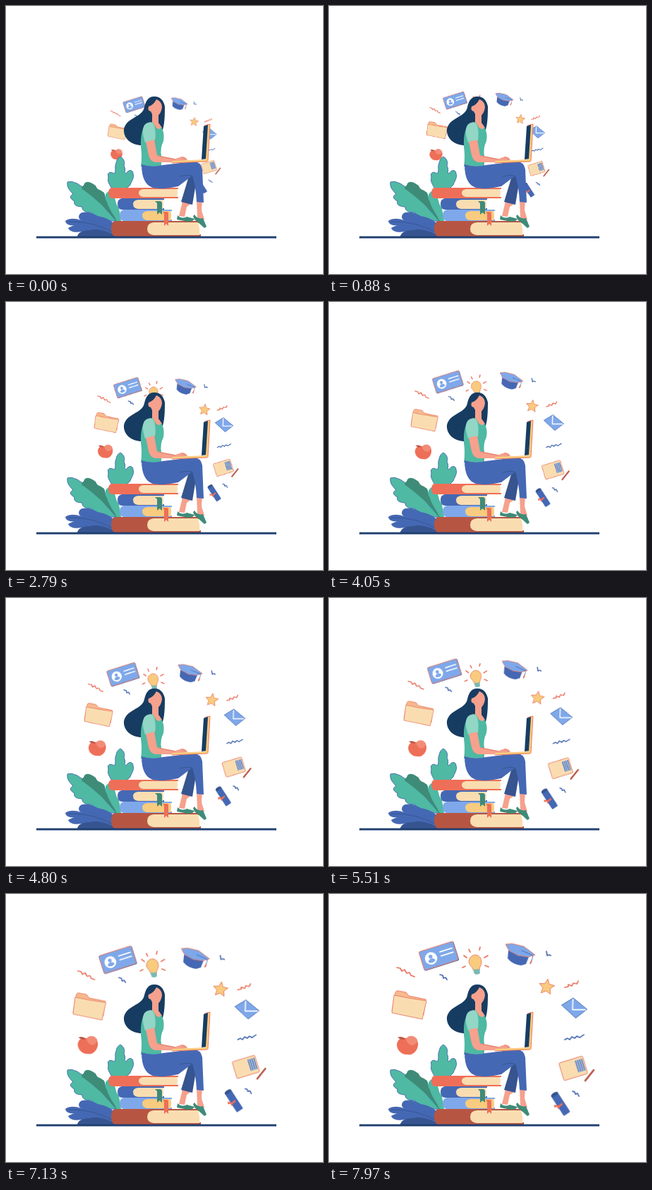
Write an HTML page that moves like this. It is 449x379 px and loops after 8000 ms.

```html
<!DOCTYPE html>
<html lang="en">
<head>
<meta charset="utf-8">
<title>Online learning</title>
<style>
  html, body { margin: 0; width: 100%; height: 100%; overflow: hidden; background: #fff; }
  svg { display: block; width: 100vw; height: 100vh; }
  #icons { transform-origin: 213.7px 204.4px; }
  .navy { fill: #173c62; } .blue { fill: #4568b4; } .deep { fill: #36548f; }
  .sky { fill: #7ea8ea; } .teal { fill: #4fb9a3; } .mint { fill: #92d6c5; }
  .green { fill: #3e8b78; } .skin { fill: #f5a18d; } .red { fill: #ee6f58; }
  .brick { fill: #b75543; } .cream { fill: #f9ddb1; } .gold { fill: #f8cb7e; }
  .line { fill: none; stroke-width: 1.7; stroke-linejoin: round; stroke-linecap: round; }
  .thin { stroke-width: .9; } .thick { stroke-width: 2.6; }
  .lr { stroke: #e9705a; } .lb { stroke: #4467b2; } .lw { stroke: #fff; }
  .ld { stroke: #36548f; } .ls { stroke: #d9806e; } .lk { stroke: #b75543; }
  .rimR { stroke: #ea7861; stroke-width: .9; } .rimB { stroke: #4467b2; stroke-width: .9; }
</style>
</head>
<body>
<svg viewBox="0 0 449 379" xmlns="http://www.w3.org/2000/svg">
  <g id="icons">
    <!-- id card -->
    <g transform="translate(155.5 87.5) rotate(-17.5)">
      <rect class="blue" x="-25.5" y="-13.5" width="51.5" height="28" rx="2"/>
      <rect class="sky rimR" x="-25.5" y="-14" width="50.5" height="27.5" rx="2"/>
      <circle cx="-11.5" cy="0" r="8.8" fill="#fff"/>
      <circle class="sky" cx="-11.5" cy="-2.6" r="2.7"/>
      <path class="sky" d="M-16.5 4.5c0-5.500 10-5.500 10 0q-5 3.500-10 0z"/>
      <path class="line lw" d="M3-5H21M3 1H21"/>
    </g>
    <!-- light bulb -->
    <path class="line lr" d="M200 82L198 78M213 79L214 75M220 90L225 87M221 101L226 103M193 102L189 104M195 90L191 87"/>
    <path class="gold rimR" d="M204 107C203 102 198 101 198 95C199 89 203 86 208 86C213 87 216 91 216 96C216 101 213 102 213 108Z"/>
    <path fill="#79b9b2" d="M204 107L213 106L214 112Q210 115 206 113Z"/>
    <!-- graduation cap -->
    <path class="blue" d="M254 80L253 91Q259 99 272 101L279 99L283 89Z"/>
    <path class="sky rimR" d="M250 71L259 70L276 74L292 86L282 89L268 87L255 80Z"/>
    <path class="line lb thin" d="M273 80L289 87L286 98"/>
    <path class="line lr" d="M287 94L285 98"/>
    <path class="line lb" d="M308 81L309 87L312 86L314 87"/>
    <!-- star -->
    <path class="gold rimR" transform="translate(308.300 131.500) rotate(8)"
      d="M0-11.500L3.200-4.400L10.900-3.500L5.200 1.700L6.700 9.300L0 5.500L-6.700 9.300L-5.200 1.700L-10.900-3.500L-3.200-4.400Z"/>
    <path class="line lr" d="M334 132L339 131L339 128L344 130L346 126L351 127L353 123"/>
    <!-- envelope -->
    <path class="sky rimB" d="M329.500 157L346 147L365.500 163L349.500 175.500Z"/>
    <path class="line lw" d="M345.500 149L345 163.500L363 163.500"/>
    <path class="line lb" d="M334 206L338 204L341 206L344 202L348 204L351 201L355 203L361 199"/>
    <!-- notepad and pencil -->
    <g transform="translate(346 246.5) rotate(-17)">
      <rect class="cream rimR" x="-17.5" y="-13" width="35" height="26" rx="1.5"/>
      <path fill="#a9bcd6" d="M5-9.500H16V8H5z"/>
      <path class="line thin lb" d="M6-9V7M9-9V7M12-9V7M15-9V7"/>
    </g>
    <path class="line thick lk" d="M363 264L375 249"/>
    <path class="line lb" d="M345 279L348 280L349 283L352 282L354 286"/>
    <!-- diploma -->
    <g transform="translate(328 296.8) rotate(57)">
      <rect class="blue" x="-17" y="-5.5" width="34" height="11" rx="1.5"/>
      <ellipse class="deep" cx="-16" cy="0" rx="2.5" ry="5.5"/>
    </g>
    <path class="red" d="M319 298L325 299L330 295L331 298L327 301L325 305L323 301L319 302Z"/>
    <!-- apple -->
    <path class="red" d="M111 204C119 198 127 205 126 214C125 223 117 229 111 227C103 228 96 221 96 213C97 204 104 202 111 204Z"/>
    <path fill="#f28c76" d="M109 205C112 199 121 199 125 206C125 215 112 218 109 205Z"/>
    <path class="brick" d="M97 203Q103 200 108 205Q102 207 97 203Z"/>
    <!-- folder -->
    <path fill="#f6b98d" class="rimR" d="M92 146L94 139Q95 136 99 137L109 139L113 144L137 149L134 171L89 166Z"/>
    <path class="cream rimR" d="M92 143L112 147L138 151L132 177L89 168Z"/>
    <path class="line lr" d="M96 104L101 105L103 109L107 107L110 112L114 111L116 115L121 117"/>
    <path class="line lb" d="M157 114L161 115L162 119L165 118L167 121"/>
  </g>

  <!-- plants -->
  <path class="teal rimB" d="M150 259C147 252 143 249 145 242C143 236 147 233 153 237C157 233 153 228 156 222C157 216 160 214 162 213C167 216 169 221 167 226C171 232 166 235 170 237C173 231 180 231 180 237C182 243 178 247 176 253L169 260Z"/>
  <path class="teal" d="M157 305C139 297 137 279 141 267C143 261 150 260 151 266C156 271 154 279 160 286L163 304Z"/>
  <path class="teal rimB" d="M157 305L113 255C107 258 104 251 98 250C94 248 90 248 87 249C86 257 90 260 95 266C89 269 91 273 97 276C95 282 102 284 108 284C107 290 114 292 121 292C128 300 143 303 157 305Z"/>
  <path class="green" d="M157 305Q138 280 107 258C108 254 110 255 111 251C115 246 122 250 127 254C129 260 132 259 136 262C143 265 138 271 143 277C145 287 153 294 157 305Z"/>
  <path class="blue" d="M157 326H101C102 323 103 321 107 319C98 321 90 319 88 314C91 312 94 311 97 310C90 311 85 309 84 304C89 300 98 300 106 303C101 300 103 293 108 292C116 290 125 294 130 297C142 299 151 304 157 312Z"/>
  <path class="deep" d="M156 326H101C102 321 109 317 118 317C130 314 144 318 156 326Z"/>
  <path class="line thin ld" d="M88 305Q125 304 153 321"/>

  <!-- books -->
  <path class="brick" d="M155 304H274V307H272V323H276V326H155Q149 325 149 315Q149 305 155 304Z"/>
  <path class="cream" d="M209 306H272Q275 315 274 324H209Q200 323 200 315Q200 307 209 306Z"/>
  <path class="sky" d="M167 288H235V290H233V302H235V304H167Q161 303 161 296Q161 289 167 288Z"/>
  <path class="gold" d="M200 290H233Q235 296 233 303H200Q193 302 193 296Q193 291 200 290Z"/>
  <path class="blue" d="M164 272H224V274H222V286H224V288H164Q158 287 158 280Q158 273 164 272Z"/>
  <path class="cream" d="M187 274H222Q224 280 222 287H187Q180 286 180 280Q180 275 187 274Z"/>
  <path class="red" d="M150 257H244V259H242V270H244V272H150Q145 271 145 264Q145 258 150 257Z"/>
  <path class="cream" d="M194 259H242Q244 264 242 270H194Q188 269 188 264Q188 260 194 259Z"/>
  <path class="green" d="M211 276H219L221 278V295L217.500 292L214 295V279Z"/>
  <path class="red" d="M222 291H229L230 293V311L227 308L224 311V294Z"/>

  <!-- woman -->
  <path class="navy" d="M211 128C202 127 198 134 196 143C193 158 171 157 167 174C166 187 177 197 193 197L211 185L222 175C225 166 225 150 225 142C223 133 218 128 211 128Z"/>
  <path class="skin" d="M250 276L263 279L256 284L253 298L245 297Z"/>
  <path class="skin" d="M270 274H278L277 289L281 302L271 300Z"/>
  <path class="deep" d="M261 234L271 239L264 281L248 277Z"/>
  <path class="skin" d="M207 150H216V165L221 172L211 187L200 171L207 164Z"/>
  <path class="skin" d="M213 132Q221 135 221 143Q220 152 214 156Q207 155 205 149Q200 148 202 142Q209 140 213 132Z"/>
  <path class="teal" d="M199 166Q206 163 209 166Q213 175 218 174L220 171Q225 180 223 191Q218 201 220 212L220 227H191Q193 213 191 199Q190 175 199 166Z"/>
  <path class="blue" d="M192 224Q207 229 222 225L264 220Q276 219 278 231L280 278L270 277Q269 256 264 240L244 255Q223 260 208 257Q192 252 192 224Z"/>
  <path class="line thin ld" d="M263 240Q255 238 246 241"/>
  <path class="mint" d="M199 166Q206 162 209 167Q213 175 211 190L197 193Q193 181 194 174Q195 168 199 166Z"/>
  <path class="skin" d="M198 192L210 189L214 211L240 216L249 213Q255 213 257 218L247 220L236 221L211 221Q204 219 202 211Z"/>
  <path class="line thin ls" d="M215 212L239 217M249 214L255 217"/>
  <path class="green" d="M243 296Q249 302 256 298L267 301Q265 305 258 305L242 302Z"/>
  <path class="green" d="M267 295Q271 302 279 300L284 312L281 314L271 305Q266 302 265 297Z"/>

  <!-- laptop -->
  <path class="gold" d="M285 168L289 167L286 219L280 219Z"/>
  <path class="line thin lr" d="M281 169L289 167L286 219"/>
  <path class="navy" d="M280 170L286 168L283 216L277 217Z"/>
  <path class="gold" d="M235 219L284 217L286 220L236 222Z"/>
  <path class="line thin lr" d="M235 222L285 220"/>

  <!-- floor -->
  <rect x="43" y="325.600" width="340" height="2.900" fill="#203f70"/>
</svg>
<script>
  // The ring of icons spreads steadily outward from behind the reader.
  const start = 0.557, end = 1.001;
  document.getElementById("icons").animate(
    [{ transform: `scale(${start})` }, { transform: `scale(${end})` }],
    { duration: 8000, iterations: Infinity, easing: "linear" }
  );
</script>
</body>
</html>
```
